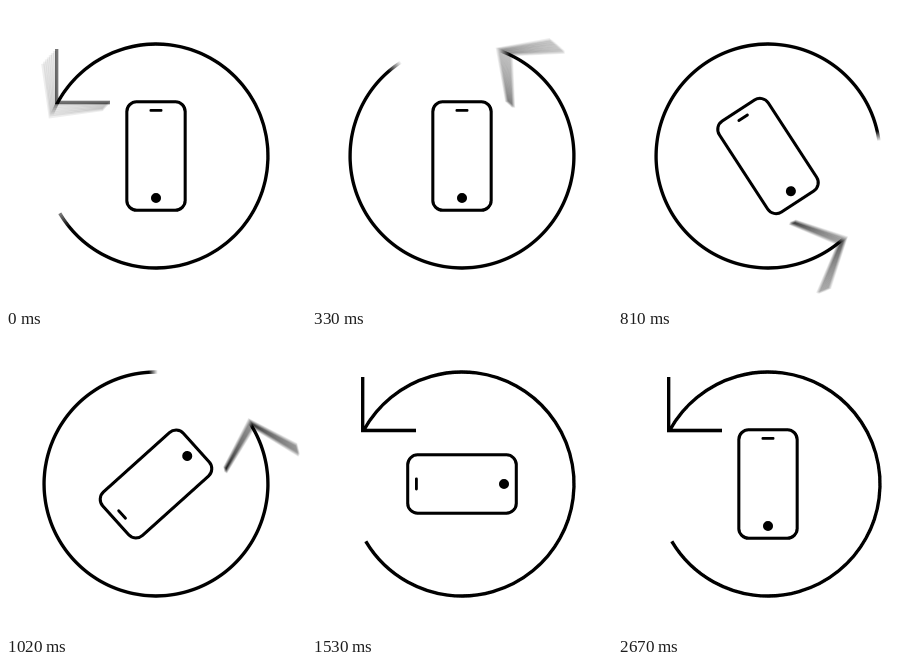
These frames come from a looping animation (300 px wide and 300 px high, 2.7 s). An HTML page with a canvas:

```html
<!DOCTYPE html>
<html>
<head>
<meta charset="utf-8">
<title>Rotate your phone</title>
<style>
html, body { margin: 0; height: 100%; overflow: hidden; background: #fff; }
canvas { display: block; }
</style>
</head>
<body>
<canvas id="stage" width="300" height="300"></canvas>
<script>
const ctx = document.getElementById('stage').getContext('2d');
const LOOP = 2700, STEP = 30, SHUTTER = 12, SAMPLES = 15;
const RAD = Math.PI / 180;

const clamp = x => Math.min(1, Math.max(0, x));
const span = (t, from, to) => clamp((t - from) / (to - from));
const smooth = x => x * x * (3 - 2 * x);

// Cubic bezier easing, solved by bisection
function bezier(x1, y1, x2, y2) {
  const at = (u, a, b) => 3 * (1 - u) ** 2 * u * a + 3 * (1 - u) * u * u * b + u ** 3;
  return x => {
    let lo = 0, hi = 1;
    for (let i = 0; i < 24; i++) {
      const mid = (lo + hi) / 2;
      if (at(mid, x1, x2) < x) lo = mid; else hi = mid;
    }
    return x <= 0 ? 0 : x >= 1 ? 1 : at(lo, y1, y2);
  };
}

const spin = bezier(0.167, 0.48, 0.79, 1);
const arrowAngle = t => -720 * spin(span(t, 0, 1530));

// Time and angle of each pose of the phone
const poses = [[600, 0], [810, -33], [1020, -132], [1290, -90]];

function phoneAngle(t) {
  if (t > 2300) return -90 * (1 - span(t, 2400, 2670)) ** 5;
  let angle = 0;
  for (let i = 1; i < poses.length; i++) {
    const [t0, a0] = poses[i - 1], [t1, a1] = poses[i];
    angle += (a1 - a0) * smooth(span(t, t0, t1));
  }
  return angle;
}

function rotated(angle, draw) {
  ctx.save();
  ctx.translate(150, 150);
  ctx.rotate(angle * RAD);
  ctx.beginPath();
  draw();
  ctx.restore();
}

function drawArrow() {
  const from = 209 * RAD, to = 509.2 * RAD, r = 112;
  ctx.lineWidth = 3.3;
  ctx.moveTo(-99.3, -107);
  ctx.lineTo(-99.3, -53.5);
  ctx.lineTo(-46, -53.5);
  ctx.moveTo(r * Math.cos(from), r * Math.sin(from));
  ctx.arc(0, 0, r, from, to);
  ctx.stroke();
}

function drawPhone() {
  ctx.lineWidth = 3;
  ctx.roundRect(-29.2, -54.3, 58.4, 108.6, 10);
  ctx.stroke();
  ctx.beginPath();
  ctx.arc(0, 42, 5, 0, 7);
  ctx.roundRect(-6.5, -47, 13, 2.8, 1.4);
  ctx.fill();
}

// Sums evenly weighted samples across the shutter for motion blur
function render(t) {
  ctx.clearRect(0, 0, 300, 300);
  ctx.globalCompositeOperation = 'lighter';
  ctx.globalAlpha = 1 / SAMPLES;
  for (let i = 0; i < SAMPLES; i++) {
    const s = t + SHUTTER * (i / (SAMPLES - 1) - 0.5);
    rotated(arrowAngle(s), drawArrow);
    rotated(phoneAngle(s), drawPhone);
  }
}

const start = performance.now();
function tick() {
  const t = (performance.now() - start) % LOOP;
  render(Math.floor(t / STEP) * STEP);
  requestAnimationFrame(tick);
}
tick();
</script>
</body>
</html>
```
